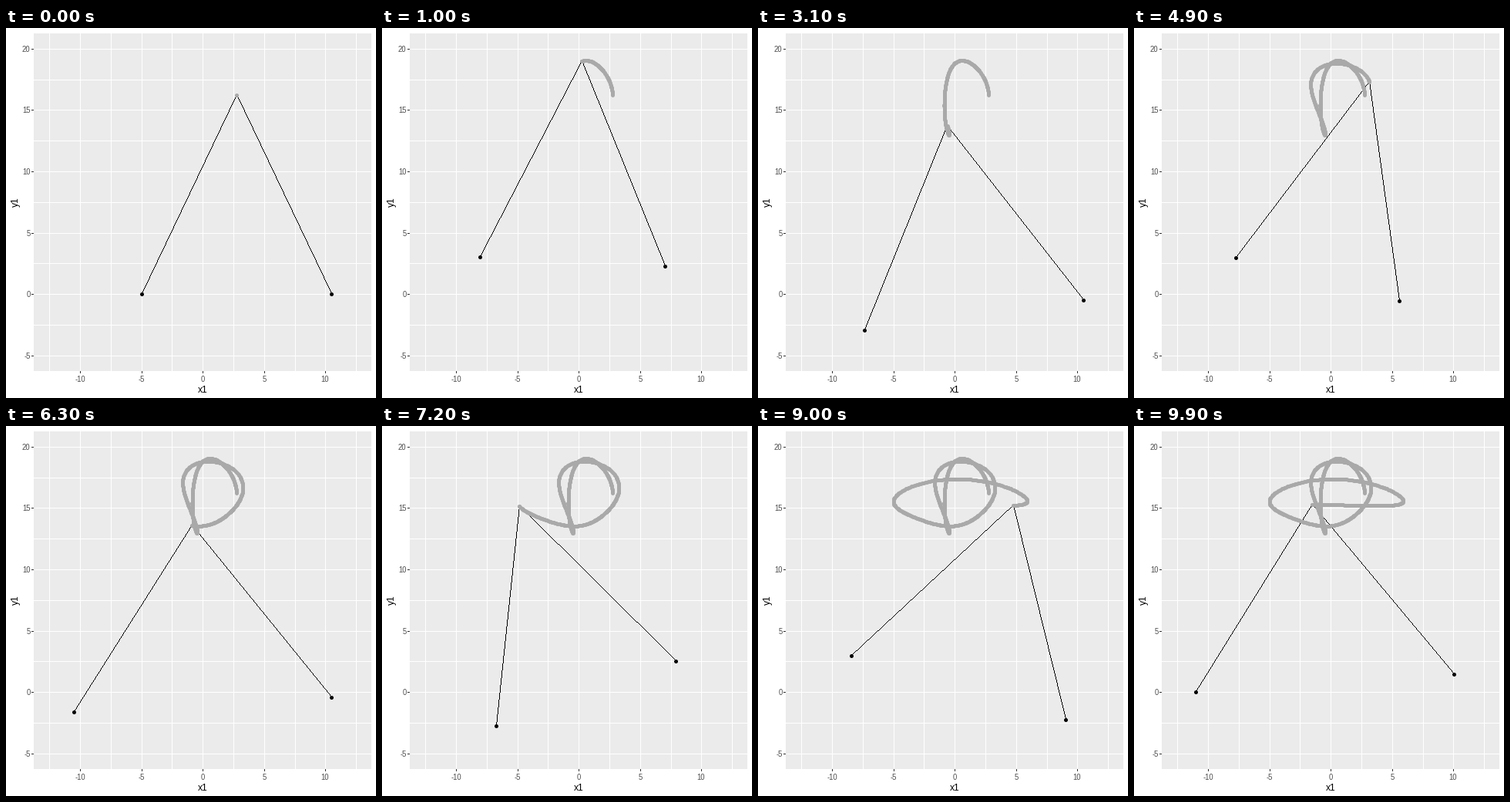
These frames come from a looping animation (480x480 px, 10 s). A matplotlib script:

```python
import numpy as np
import matplotlib.pyplot as plt
from matplotlib.animation import FuncAnimation
from matplotlib.patches import Circle, Rectangle

SIZE, FRAMES, SUB = 480, 100, 10
LEFT, RIGHT, TOP, BOTTOM = 36, 474, 7, 445
UNIT, X0, Y0 = 15.92, 255.15, 345.25
ARM, TICK, DOT = 18, 3, 5
GREY = "#A9A9A9"

plt.rcParams["font.family"] = "Liberation Sans"
plt.rcParams["path.simplify"] = False


def px(x):
    return np.rint(X0 + UNIT * x)


def py(y):
    return np.rint(Y0 - UNIT * y)


def crank(center, radius, turns, t):
    a = 2 * np.pi * turns * t
    return center + radius * np.cos(a), radius * np.sin(a)


def linkage(t):
    """Both crank pins with the pen between them, in whole pixels."""
    ax1, ay1 = crank(-8, 3, 2.5, t)
    ax2, ay2 = crank(8, 2.5, 3.1, t)
    dx, dy = ax2 - ax1, ay2 - ay1
    d = np.hypot(dx, dy)
    h = np.sqrt(ARM**2 - (d / 2) ** 2)
    penx = (ax1 + ax2) / 2 - h * dy / d
    peny = (ay1 + ay2) / 2 + h * dx / d
    return px(np.array([ax1, penx, ax2])), py(np.array([ay1, peny, ay2]))


def pixel_line(x1, y1, x2, y2):
    """Whole pixels of a one-pixel line without smoothing."""
    n = int(max(abs(x2 - x1), abs(y2 - y1))) + 1
    return np.rint([np.linspace(x1, x2, n), np.linspace(y1, y2, n)])


# One data unit per pixel; one point equals one pixel at 72 dpi
fig = plt.figure(figsize=(SIZE / 72, SIZE / 72), dpi=72, facecolor="white")
ax = fig.add_axes([0, 0, 1, 1])
ax.set(xlim=(0, SIZE), ylim=(SIZE, 0))
ax.axis("off")


def box(x, y, w, h, color):
    ax.add_patch(Rectangle((x, y), w, h, fc=color, lw=0))


def disc(color, z):
    return ax.add_patch(Circle((0, 0), DOT / 2, fc=color, lw=0, zorder=z))


box(LEFT, TOP, RIGHT - LEFT, BOTTOM - TOP, "#EBEBEB")
for x in np.arange(-12.5, 13, 2.5):
    box(px(x), TOP, 1, BOTTOM - TOP, "white")
for y in np.arange(-5, 21, 2.5):
    box(LEFT, py(y), RIGHT - LEFT, 1, "white")

label = dict(fontsize=9.5, color="#4D4D4D", va="baseline")
for x in range(-10, 11, 5):
    box(px(x), BOTTOM, 1, TICK, "#333333")
    ax.text(px(x), 459, str(x), ha="center", **label)
for y in range(-5, 21, 5):
    box(LEFT - TICK, py(y), TICK, 1, "#333333")
    ax.text(31.5, py(y) + 4, str(y), ha="right", **label)

title = dict(fontsize=12, color="black", ha="center", va="baseline")
ax.text(255, 473, "x1", **title)
ax.text(16, 226, "y1", rotation=90, rotation_mode="anchor", **title)

path_x, path_y = linkage(np.linspace(0, 1, (FRAMES - 1) * SUB + 1))

arms, = ax.plot([], [], ls="", marker=",", color="black", zorder=3)
pins = [disc("black", 4), disc("black", 4)]
trail, = ax.plot([], [], color=GREY, lw=DOT, zorder=5, snap=False,
                 solid_capstyle="round", solid_joinstyle="round")
pen = disc(GREY, 6)


def update(i):
    k = i * SUB
    x, y = path_x[:, k], path_y[:, k]
    arms.set_data(np.hstack([pixel_line(x[j], y[j], x[1], y[1])
                             for j in (0, 2)]))
    for mark, j in ((pins[0], 0), (pen, 1), (pins[1], 2)):
        mark.center = x[j] + 0.5, y[j] + 0.5
    trail.set_data(path_x[1, :k + 1] + 0.5, path_y[1, :k + 1] + 0.5)
    return arms, *pins, trail, pen


anim = FuncAnimation(fig, update, frames=FRAMES, interval=100,
                     repeat=True, repeat_delay=0, blit=False)
plt.show()
```
